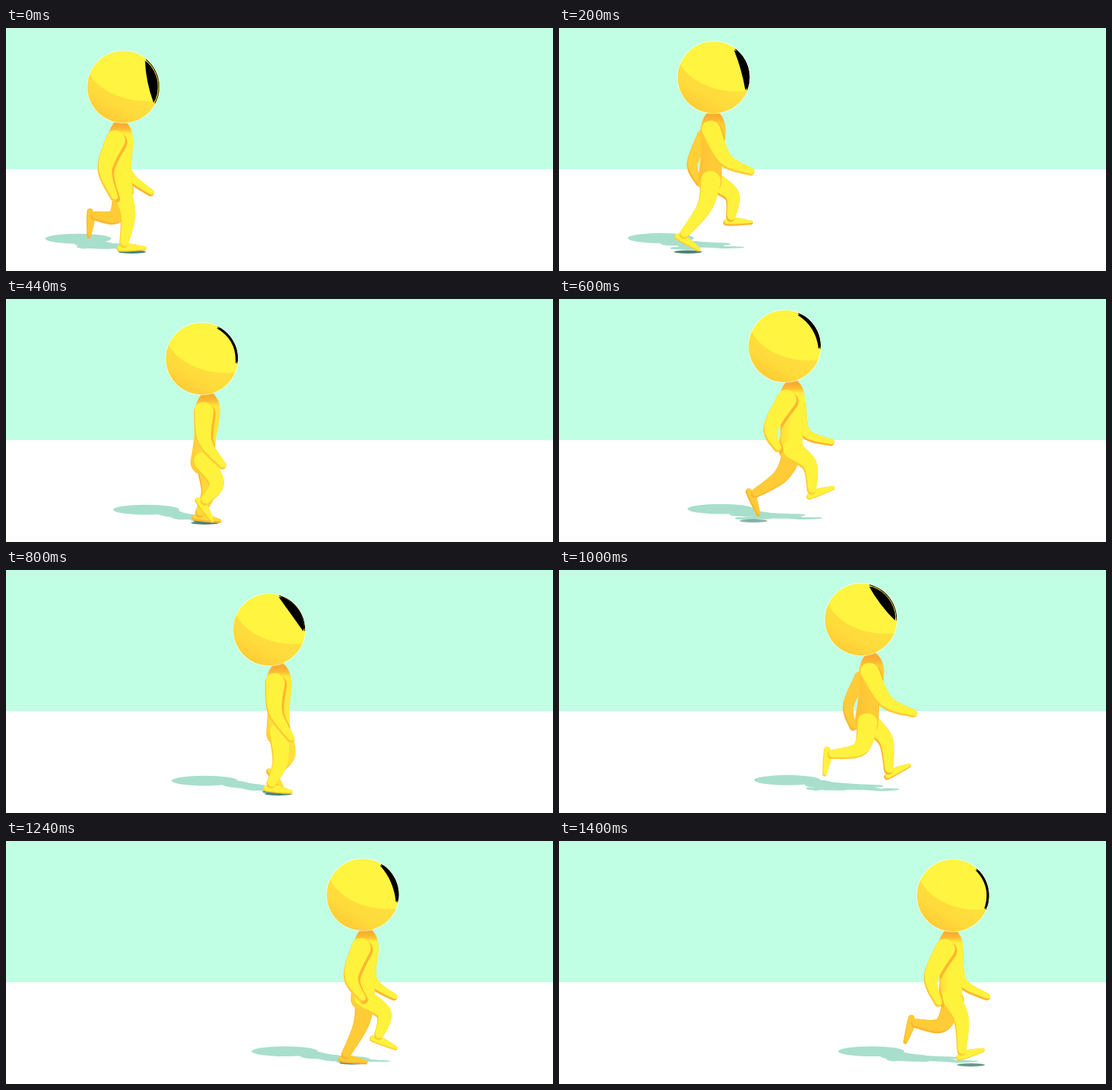
Write an HTML page with a canvas that moves like this. It is 750x334 px and loops after 1440 ms.

```html
<!DOCTYPE html>
<html lang="en">
<head>
<meta charset="utf-8">
<title>Running figure</title>
<style>
html, body { margin: 0; width: 100%; height: 100%; overflow: hidden; background: #fff; }
canvas { display: block; width: 750px; height: 334px; }
</style>
</head>
<body>
<canvas id="stage" width="750" height="334"></canvas>
<script>
const ctx = document.getElementById('stage').getContext('2d');
const LOOP = 1440, STRIDE = LOOP / 2, STEP = STRIDE / 2, TICK = 40;
const GROUND = 306, SPEED = .2715, RADIUS = 49.3;
const TURN = Math.PI * 2, DEG = Math.PI / 180;
const YELLOW = [255, 242, 60], AMBER = [255, 203, 54], ORANGE = [253, 182, 48];

const clamp = v => Math.max(0, Math.min(1, v));
const css = c => `rgb(${c.map(Math.round)})`;
const mix = (a, b, u) => a.map((v, i) => v + (b[i] - v) * u);
const polar = (r, a) => [r * Math.cos(a), r * Math.sin(a)];

// Periodic motion: a mean plus cosine and sine weights of each harmonic.
function wave(angle, mean, ...weights) {
  return weights.reduce((sum, w, i) => {
    const a = angle * ((i >> 1) + 1);
    return sum + w * (i % 2 ? Math.sin(a) : Math.cos(a));
  }, mean);
}

// Catmull-Rom point on a list of [x, y, radius].
function along(points, pos) {
  const i = Math.min(Math.floor(pos), points.length - 2), u = pos - i;
  const at = k => points[Math.max(0, Math.min(points.length - 1, k))];
  const [a, b, c, d] = [i - 1, i, i + 1, i + 2].map(at);
  return b.map((v, k) => v + u / 2 * (c[k] - a[k]
    + u * (2 * a[k] - 5 * v + 4 * c[k] - d[k] + u * (3 * (v - c[k]) + d[k] - a[k]))));
}

function disc(path, x, y, r) {
  path.moveTo(x + r, y);
  path.arc(x, y, r, 0, TURN);
}

// Tapered tube built from overlapping discs.
function tube(points, path = new Path2D(), dot = disc) {
  const detail = 18;
  for (let s = 0; s <= (points.length - 1) * detail; s++) {
    dot(path, ...along(points, s / detail));
  }
  return path;
}

function paint(path, lit, shade, dx = 1.5, dy = -2.5) {
  ctx.fillStyle = shade;
  ctx.fill(path);
  ctx.save();
  ctx.clip(path);
  ctx.translate(dx, dy);
  ctx.fillStyle = lit;
  ctx.fill(path);
  ctx.restore();
}

// Limb positions are relative to the neck.
function armPoints(p, far) {
  const ex = wave(p, -5, -16.6, 19);
  const hx = wave(p, 18, -27, 29), hy = wave(p, 91, 5.4, -4.3, 4.7, 6.1);
  return far
    ? [[ex * .5, 30, 9], [ex - 2, 69, 7.5], [hx - 4, hy + 5, 5]]
    : [[-5 + ex * .1, 23, 13.5], [ex, 63, 10], [hx, hy, 5.5]];
}

function legPoints(p, hip, far) {
  const knee = [wave(p, 4.9, 7.9, -17.5, -3, 2.4), wave(p, 123.7, -.3, 7.8, 3.2, 2.3)];
  const ax = wave(p, -10.7, 21.7, -29.7, -4.3, 4.2, -2, -2.3);
  const ay = wave(p, 150.6, 14.8, 6.9, -4.7, 3.7, 3.8, -6.5);
  const pitch = wave(p, 43, -52, 14, 16, -1.5, 5.4, 11.4) * DEG;
  const place = (forward, down, r) => [
    ax + forward * Math.cos(pitch) - down * Math.sin(pitch),
    ay + forward * Math.sin(pitch) + down * Math.cos(pitch), r];
  return {
    leg: [[hip[0] + (far ? 4 : 1), hip[1], 14], [...knee, 10.5], [ax, ay, 6.3]],
    foot: [place(-4, 8.5, 4.3), place(8, 4.5, 5.5), place(29, 1, 2.8)]
  };
}

function drawShadow(t, nx, ny, head, limbs, feet) {
  const slant = .275 + .00015 * t;
  const shadow = new Path2D();
  const cast = flat => (path, x, y, r) => {
    const h = GROUND - ny - y;
    const px = nx + x - slant * h, py = GROUND - 2 - .064 * h;
    path.moveTo(px + r * .92, py);
    path.ellipse(px, py, r * .92, r * flat, 0, 0, TURN);
  };
  limbs.forEach(points => tube(points, shadow, cast(.27)));
  cast(.14)(shadow, ...head, RADIUS);
  ctx.fillStyle = '#a8dfcc';
  ctx.fill(shadow);

  feet.forEach(([heel, , toe], far) => {
    const gap = 299 - ny - Math.max(heel[1], toe[1]);
    ctx.globalAlpha = clamp(1 - gap / 8);
    ctx.fillStyle = '#4c8375';
    ctx.beginPath();
    ctx.ellipse(nx + (heel[0] + toe[0]) / 2, far ? 305 : 307.8, 19, 2.2, 0, 0, TURN);
    ctx.fill();
  });
  ctx.globalAlpha = 1;
}

function drawTorso(path, light) {
  const body = mix(AMBER, YELLOW, light);
  const side = ctx.createLinearGradient(-22, 0, 12, 0);
  side.addColorStop(0, css(mix(ORANGE, body, .5)));
  side.addColorStop(.55, css(body));
  paint(path, side, css(AMBER));
  ctx.save();
  ctx.clip(path);
  const collar = ctx.createLinearGradient(0, 2, 0, 15);
  collar.addColorStop(0, 'rgb(251,172,48)');
  collar.addColorStop(.5, 'rgba(252,180,48,.8)');
  collar.addColorStop(1, 'rgba(255,200,54,0)');
  ctx.fillStyle = collar;
  ctx.fillRect(-40, -10, 80, 30);
  ctx.restore();
}

// The visor lies between a bowed inner edge and the rim of the head.
function drawVisor(axis, depth) {
  const open = clamp((42 - depth) / 8);
  const half = (36 + 3 * open) * DEG, outer = RADIUS + 1 - 3 * open;
  const chord = 46.5 * Math.cos(half);
  ctx.save();
  ctx.rotate(axis);
  ctx.fillStyle = ctx.strokeStyle = '#000';
  ctx.beginPath();
  ctx.moveTo(...polar(46.5, -half));
  ctx.quadraticCurveTo(2 * depth - chord, 0, ...polar(46.5, half));
  ctx.arc(0, 0, outer, half - .1, .1 - half, true);
  ctx.closePath();
  ctx.fill();
  ctx.lineWidth = 1.2;
  ctx.beginPath();
  ctx.arc(0, 0, RADIUS - .4, -half, half);
  ctx.stroke();
  ctx.restore();
}

function drawHead(x, y, t, tilt) {
  const ball = new Path2D();
  disc(ball, 0, 0, RADIUS);
  ctx.save();
  ctx.translate(x, y);
  ctx.strokeStyle = 'rgba(255,255,235,.6)';
  ctx.lineWidth = 2;
  ctx.stroke(ball);
  ctx.fillStyle = '#fff440';
  ctx.fill(ball);
  ctx.clip(ball);

  const under = ctx.createLinearGradient(-18, 50, 8, 5);
  under.addColorStop(0, '#ffca36');
  under.addColorStop(.5, '#ffdb3c');
  under.addColorStop(1, '#ffdf3d');
  const left = -17 - 7 * clamp(t / 1000);
  ctx.fillStyle = under;
  ctx.beginPath();
  ctx.moveTo(-52, left - 9);
  ctx.lineTo(-46, left);
  ctx.bezierCurveTo(-34, 5, 4, 23, 46, 19);
  ctx.lineTo(60, 60);
  ctx.lineTo(-60, 60);
  ctx.fill();

  const depth = 40 - 6.2 * Math.cos(TURN * t / 950);
  drawVisor((1.4 * tilt - 17) * DEG, depth);
  ctx.restore();
}

function draw(t) {
  ctx.fillStyle = '#fff';
  ctx.fillRect(0, 0, 750, 334);
  ctx.fillStyle = '#c0ffe4';
  ctx.fillRect(0, 0, 750, 194);

  const p = TURN * t / STRIDE, q = p + Math.PI;
  const nx = 157 + SPEED * t;
  const ny = wave(TURN * t / STEP, 125.2, 5.1, 7.4, .9, -.7);
  const tilt = wave(TURN * t / LOOP, -6.5, 8, 3.5, 2.5);
  const head = [tilt, -50.3];
  const hip = [-4 + 4 * Math.cos(p), 92.5];

  const nearArm = armPoints(p, false), farArm = armPoints(q, true);
  const near = legPoints(p, hip, false), far = legPoints(q, hip, true);
  const torso = [[0, 0, 7], [0, 20, 17], [hip[0] * .5, 58, 15], [hip[0], hip[1], 16.5]];

  drawShadow(t, nx, ny, head,
    [nearArm, farArm, near.leg, near.foot, far.leg, far.foot, torso], [near.foot, far.foot]);

  ctx.save();
  ctx.translate(nx, ny);
  const yellow = css(YELLOW), amber = css(AMBER), orange = css(ORANGE);
  const farTone = x => css(mix(AMBER, YELLOW, clamp((x + 25) / 40)));

  paint(tube(farArm), farTone(farArm[2][0]), orange);
  const legTone = farTone(far.leg[2][0]);
  paint(tube(far.foot), legTone, orange);
  paint(tube(far.leg), legTone, orange);

  // A forward arm keeps the light off the torso.
  const torsoPath = tube(torso);
  drawTorso(torsoPath, 1 - clamp((nearArm[2][0] - 10) / 35));

  paint(tube(near.foot), yellow, amber, 1, -1.5);
  paint(tube(near.leg), yellow, amber);

  const armPath = tube(nearArm);
  ctx.save();
  ctx.clip(torsoPath);
  ctx.translate(3, 2.5);
  ctx.fillStyle = orange;
  ctx.fill(armPath);
  ctx.restore();
  paint(armPath, yellow, amber);
  ctx.restore();

  drawHead(nx + head[0], ny + head[1], t, tilt);
}

const start = performance.now();
function tick() {
  const t = (performance.now() - start) % LOOP;
  draw(Math.floor(t / TICK) * TICK);
  requestAnimationFrame(tick);
}
tick();
</script>
</body>
</html>
```
